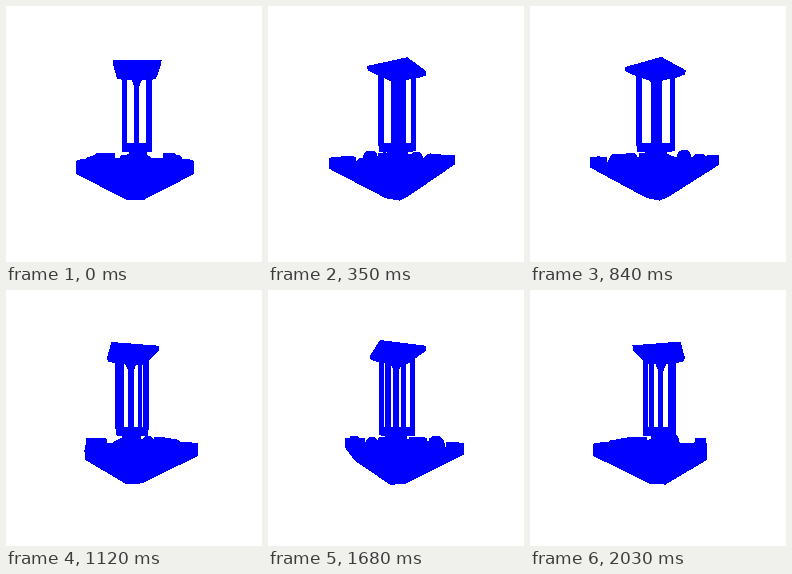
Recreate the animation shown at these times as an HTML page. Size 256 by 256 pixels, loop 2100 ms.

```html
<!DOCTYPE html>
<html lang="en">
<head>
<meta charset="utf-8">
<title>Turning tower</title>
<style>
  html, body { margin: 0; width: 100%; height: 100%; overflow: hidden; background: #fff; }
  svg { display: block; width: 100vw; height: 100vh; }
</style>
</head>
<body>
<svg viewBox="0 0 256 256"><path id="shape" fill="#00f" shape-rendering="crispEdges"/></svg>
<script>
const LOOP = 2100, STEP = 70;
const CENTER = 128, HORIZON = 133.5, DISTANCE = 213;
const shape = document.getElementById('shape');

// Solids are stacks of rectangles; y points down from the horizon, z toward the viewer.
const ring = (x, z, y, w, d = w) =>
  [[x - w, y, z - d], [x + w, y, z - d], [x + w, y, z + d], [x - w, y, z + d]];
const solid = (x, z, ...levels) => levels.flatMap(([y, w, d]) => ring(x, z, y, w, d));

// The island and the tower both sit slightly off the turning axis.
const IX = 1, IZ = 0.5, TX = 2.8, TZ = 0.5;
const RIM = 46.2, GROUND = 23;

const post = (sx, sz, w, d) => solid(
  IX + sx * (RIM - w / 2), IZ + sz * (RIM - d / 2), [16.8, w / 2, d / 2], [GROUND + 1, w / 2, d / 2]);
const lump = (x, z, top) =>
  solid(IX + x, IZ + z, [top, 3], [top + 2.5, 5], [GROUND + 1, 7]);
const column = (x, z) => solid(TX + x, TZ + z, [-63, 2], [6, 2]);

const solids = [
  solid(IX, IZ, [GROUND, RIM], [26.8, RIM], [58.2, 8]),
  post(1, 1, 22, 22),
  post(-1, -1, 22, 14),
  post(1, -1, 12, 10),
  post(-1, 1, 10, 22),
  lump(9, -40, 13),
  lump(-8, 40, 12.5),
  lump(-27, 40, 15.5),
  lump(40, -17, 15),
  lump(40, 3, 15),
  lump(-40, -9, 16),
  lump(-40, 3, 16),
  lump(-40, 16, 16),
  solid(TX, TZ, [15, 9], [18, 14], [GROUND + 1, 20]),
  solid(TX, TZ, [10, 8], [16, 8]),
  solid(TX, TZ, [3.5, 13.8], [12, 13.8]),
  column(-12, -12), column(12, -12), column(12, 12), column(-12, 12),
  solid(TX, TZ, [-63, 2.4], [6, 2.4]),
  solid(TX, TZ, [-63, 6], [-53, 2.4]),
  solid(TX, TZ, [-71.5, 22], [-67, 21.5], [-63.5, 15])
];

function project([x, y, z], angle) {
  const c = Math.cos(angle), s = Math.sin(angle);
  const scale = 1 / (1 - (z * c - x * s) / DISTANCE);
  return [CENTER + (x * c + z * s) * scale, HORIZON + y * scale];
}

function hull(points) {
  points.sort((a, b) => a[0] - b[0] || a[1] - b[1]);
  const half = list => {
    const chain = [];
    for (const p of list) {
      while (chain.length > 1) {
        const [a, b] = chain.slice(-2);
        if ((b[0] - a[0]) * (p[1] - a[1]) - (b[1] - a[1]) * (p[0] - a[0]) > 0) break;
        chain.pop();
      }
      chain.push(p);
    }
    return chain.slice(0, -1);
  };
  return [...half(points), ...half([...points].reverse())];
}

function draw(time) {
  const angle = Math.floor((time % LOOP) / STEP) * STEP / LOOP * 2 * Math.PI;
  shape.setAttribute('d', solids.map(points => {
    const outline = hull(points.map(p => project(p, angle)));
    return 'M' + outline.map(p => p.map(v => v.toFixed(2)).join(' ')).join('L') + 'Z';
  }).join(''));
}

const start = performance.now();
function tick() {
  draw(performance.now() - start);
  requestAnimationFrame(tick);
}
tick();
</script>
</body>
</html>
```
